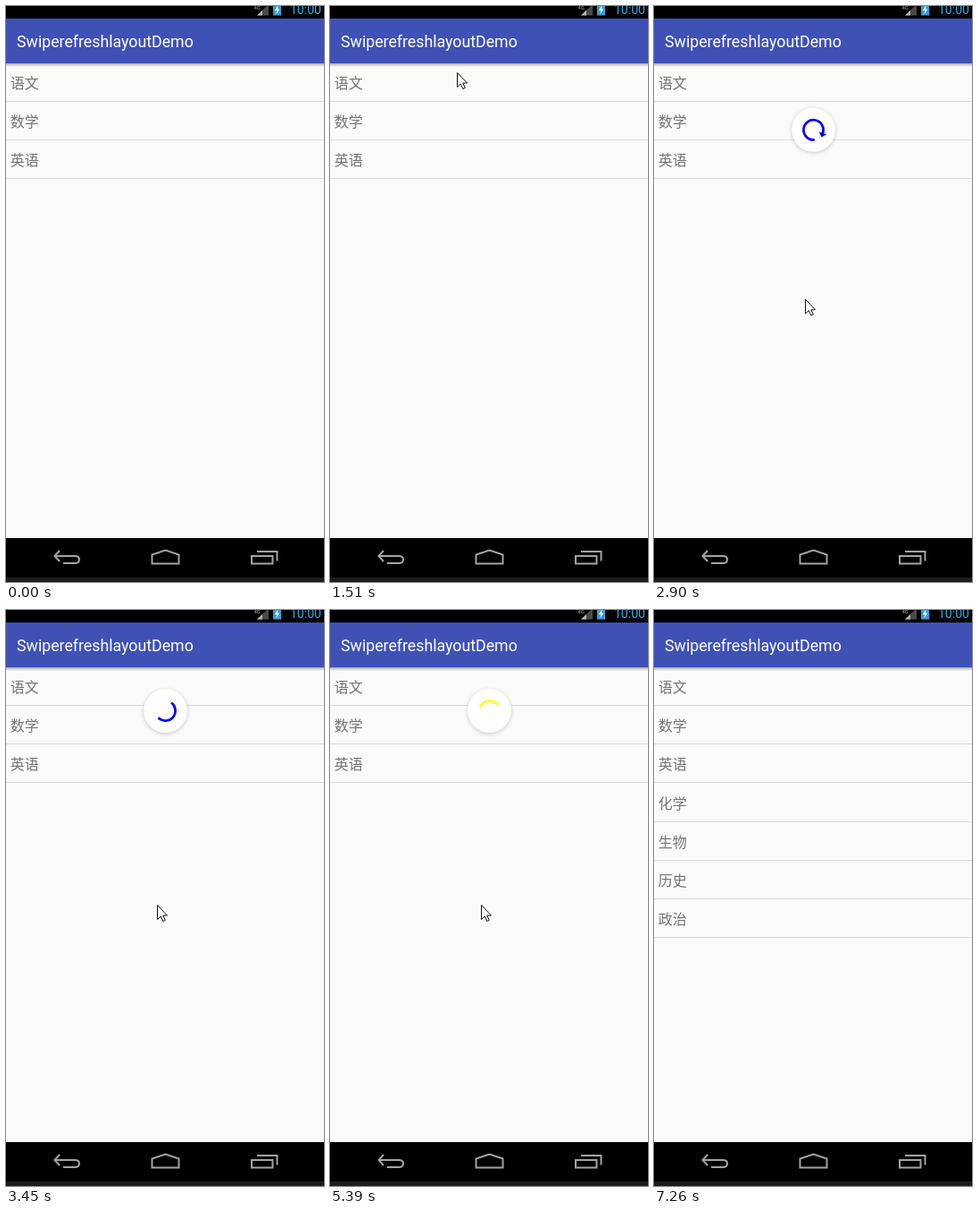
Recreate the animation shown at these times as an HTML page. Size 356 px wide and 643 px high, loop 7.95 s.

```html
<!DOCTYPE html>
<html lang="zh">
<head>
<meta charset="utf-8">
<title>Pull to refresh</title>
<style>
  html, body { margin: 0; width: 100%; height: 100%; overflow: hidden; background: #fafafa; }
  svg { display: block; }
  text { font-family: Roboto, sans-serif; }
  .row text { font: 16px "Noto Sans CJK SC", "Noto Sans CJK", "Noto Sans CJK JP", sans-serif; fill: #747474; }
  .row path { stroke: #dadada; }
  .icon { fill: none; stroke: #a3a3a3; stroke-width: 2; }
  #disc { filter: drop-shadow(0 1px 2px rgba(0, 0, 0, .22)); }
</style>
</head>
<body>
<svg width="356" height="643" viewBox="0 0 356 643">
  <defs>
    <linearGradient id="shade" x2="0" y2="1">
      <stop stop-color="#000" stop-opacity=".32"/>
      <stop offset="1" stop-color="#000" stop-opacity="0"/>
    </linearGradient>
  </defs>
  <rect width="356" height="643" fill="#fafafa"/>
  <g id="list"></g>

  <g id="spinner">
    <circle id="disc" r="24.5" fill="#fefefe"/>
    <g id="ring">
      <path id="arc" fill="none" stroke-width="2.7" stroke-linecap="square"/>
      <path id="arrow" d="M-4.5 0H4.5L0 5Z"/>
    </g>
  </g>

  <rect y="64" width="356" height="4" fill="url(#shade)"/>
  <rect width="356" height="14" fill="#000"/>
  <rect y="14" width="356" height="50" fill="#3f51b5"/>
  <text x="12" y="46" font-size="17.75" fill="#fff">SwiperefreshlayoutDemo</text>
  <text x="318" y="9" font-size="14" fill="#33a9e5">10:00</text>
  <text x="277.500" y="4" font-size="6" fill="#aaa">4G</text>
  <path d="M281 10.500L294 -2V10.500Z" fill="#4a4a4a"/>
  <path d="M281 10.500L287 4.700V10.500Z" fill="#b5b5b5"/>
  <rect x="299" y="-2" width="9" height="12.500" fill="#3d9bd3"/>
  <path d="M304.500 -1L301 5H303.300L302.500 9L306.300 3.500H304Z" fill="#fff"/>

  <rect y="594" width="356" height="44" fill="#000"/>
  <rect y="638" width="356" height="5" fill="#1d1d1d"/>
  <g class="icon">
    <path d="M60 608L54.500 614L60 620M55 614H77Q82 614 82 618T77 622H64"/>
    <path d="M163.500 622.500V612.500L178.500 607.500L193.500 612.500V622.500Z"/>
    <path d="M275 614H298.500V622.500H275ZM281 609H303.500V619.500"/>
  </g>

  <path id="cursor" d="M.5 .5V16.500L4.200 13L6.800 18.500L9.300 17.400L6.800 12H11.500Z" fill="#fff" stroke="#111"/>
</svg>
<script>
const $ = id => document.getElementById(id);
const LOOP = 7950, STEP = 77.7, FIRST = 340;
const RELEASE = 2990, SPIN = 3190, DONE = 6165, GONE = 6310;
const FINISH = 666, CYCLE = 1332;
const TOP = 39, TRAVEL = 73.5, REST = TOP + TRAVEL, SWEEP = 288, START_TURN = .28;
const COLORS = [[8, 0, 240], [24, 240, 24], [255, 255, 0], [255, 0, 0]];

// Pointer path: time, x, y
const POINTER = [
  [340, 279, 627], [418, 261, 584], [500, 261, 584], [1340, 146, 90],
  [1430, 144, 81], [1505, 142, 74], [1890, 142, 74], [2200, 148, 90],
  [2365, 148, 90], [2440, 153, 118], [2600, 162, 204], [2760, 167, 285],
  [2910, 169, 329], [6790, 169, 329], [7180, 275, 628], [7255, 280, 650]
];

const subjects = ["语文", "数学", "英语", "化学", "生物", "历史", "政治"];
$("list").innerHTML = subjects.map((name, i) => {
  const line = Math.round(106 + i * 43.2) + .5;
  return `<g class="row"><text x="4.800" y="${line - 15}">${name}</text><path d="M0 ${line}H356"/></g>`;
}).join("");

const clamp = (v, a = 0, b = 1) => Math.min(b, Math.max(a, v));
const mix = (a, b, k) => a + (b - a) * k;

// cubic-bezier(.4, 0, .2, 1)
function ease(x) {
  let lo = 0, hi = 1, u;
  for (let i = 0; i < 20; i++) {
    u = (lo + hi) / 2;
    const v = 1 - u;
    if (1.2 * v * v * u + .6 * v * u * u + u ** 3 < x) lo = u; else hi = u;
  }
  return u * u * (3 - 2 * u);
}

function pointerAt(t) {
  const i = POINTER.findIndex(p => p[0] > t);
  if (i < 1) return null;
  const [a, b] = [POINTER[i - 1], POINTER[i]];
  const k = (t - a[0]) / (b[0] - a[0]);
  return [mix(a[1], b[1], k), mix(a[2], b[2], k)];
}

// Disc height and ring while the finger drags
function pull(y) {
  const drag = (y - 123) / 2 / TRAVEL;
  const extra = clamp(drag - 1, 0, 2) / 4;
  const tension = (extra - extra * extra) * 2;
  const grown = clamp((drag - .54) / .46);
  const turn = (-.25 + .4 * grown + tension * 2) * 180;
  return {
    y: TOP + TRAVEL * (clamp(drag) + tension * 2),
    tail: turn, head: turn + SWEEP * grown, arrow: grown, color: COLORS[0],
    alpha: drag < 1 ? .4 : 1
  };
}

function blend(i, k) {
  const part = clamp((k - .75) * 4);
  return COLORS[i].map((c, j) => Math.round(mix(c, COLORS[i + 1][j], part)));
}

function spin(t) {
  const shared = { y: REST, arrow: 0, alpha: 1 };
  if (t < FINISH) {
    const k = t / FINISH, turn = mix(START_TURN, 1, k) * 360;
    return { ...shared, tail: turn + SWEEP * k, head: turn + SWEEP, color: blend(0, k) };
  }
  const n = Math.floor((t - FINISH) / CYCLE), k = (t - FINISH) / CYCLE - n;
  const base = SWEEP * (n + 1) + 306 * (n + k);
  return {
    ...shared, color: blend(n + 1, k),
    tail: base + SWEEP * ease(clamp(k * 2 - 1)),
    head: base + SWEEP * ease(clamp(k * 2))
  };
}

function spinnerAt(t, pointer) {
  if (t < 2365 || t >= GONE) return null;
  if (t >= SPIN) return spin(t - SPIN);
  const s = pull(pointer[1]);
  if (t > RELEASE) {
    const k = (t - RELEASE) / (SPIN - RELEASE);
    s.y = mix(s.y, REST, 1 - (1 - k) ** 2);
    s.arrow = 1 - k;
  }
  return s.y > TOP ? s : null;
}

function polar(deg) {
  const a = deg * Math.PI / 180;
  return `${11.1 * Math.cos(a)} ${11.1 * Math.sin(a)}`;
}

function drawSpinner(s, scale) {
  $("spinner").style.display = s ? "" : "none";
  if (!s) return;
  const head = Math.max(s.head, s.tail + .5), color = `rgb(${s.color})`;
  $("spinner").setAttribute("transform", `translate(178.5 ${s.y}) scale(${scale})`);
  $("ring").setAttribute("opacity", s.alpha);
  $("arc").setAttribute("d", `M${polar(s.tail)}A11.1 11.1 0 ${+(head - s.tail > 180)} 1 ${polar(head)}`);
  $("arc").setAttribute("stroke", color);
  $("arrow").setAttribute("fill", color);
  $("arrow").setAttribute("transform", `translate(${polar(head)}) rotate(${head}) scale(${s.arrow})`);
}

function draw(now) {
  const raw = now % LOOP;
  const t = raw < FIRST ? 0 : FIRST + Math.floor((raw - FIRST + 14) / STEP) * STEP;
  const pointer = pointerAt(t);
  $("cursor").style.display = pointer ? "" : "none";
  if (pointer) $("cursor").setAttribute("transform", `translate(${pointer.map(Math.round)})`);
  drawSpinner(spinnerAt(t, pointer), 1 - clamp((t - DONE) / (GONE - DONE)));
  [...$("list").children].forEach((row, i) => row.style.display = i < 3 || t >= DONE ? "" : "none");
}

function loop() {
  draw(performance.now());
  requestAnimationFrame(loop);
}
loop();
</script>
</body>
</html>
```
